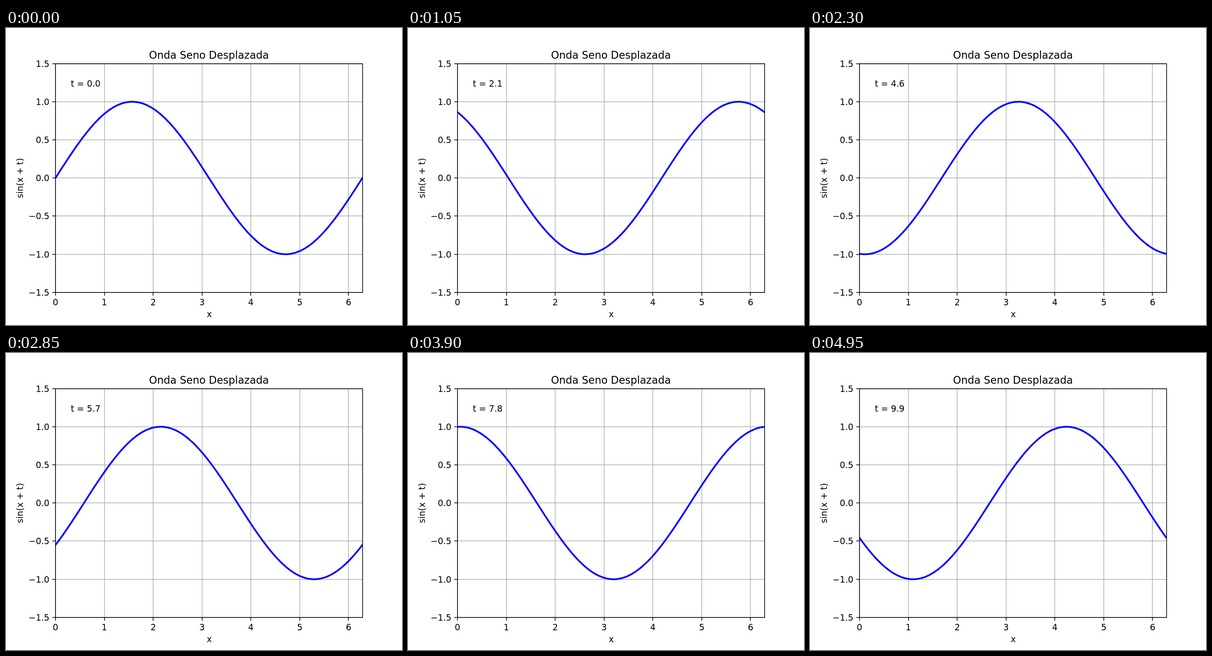
These frames come from a looping animation (864x648 px, 5000 ms). An HTML page with a canvas:

```html
<!DOCTYPE html>
<html lang="es">
<head>
<meta charset="utf-8">
<title>Onda Seno Desplazada</title>
<style>
  html, body { margin: 0; width: 100%; height: 100%; overflow: hidden; background: #fff; }
  canvas { display: block; }
</style>
</head>
<body>
<canvas id="plot" width="864" height="648"></canvas>
<script>
const ctx = document.getElementById('plot').getContext('2d');
const LEFT = 108, RIGHT = 777.6, TOP = 77.76, BOTTOM = 576.72;
const STEP_MS = 50, STEPS = 100, TAU = 2 * Math.PI;
const toX = x => LEFT + (RIGHT - LEFT) * x / TAU;
const toY = y => BOTTOM - (BOTTOM - TOP) * (y + 1.5) / 3;
const xTicks = [0, 1, 2, 3, 4, 5, 6];
const yTicks = [-1.5, -1, -0.5, 0, 0.5, 1, 1.5];

function line(x1, y1, x2, y2, color) {
  ctx.strokeStyle = color;
  ctx.lineWidth = 1.5;
  ctx.beginPath();
  ctx.moveTo(Math.round(x1), Math.round(y1));
  ctx.lineTo(Math.round(x2), Math.round(y2));
  ctx.stroke();
}

function label(text, x, y, align = 'center', size = 18.75) {
  ctx.font = `${size}px "DejaVu Sans", sans-serif`;
  ctx.textAlign = align;
  ctx.fillStyle = '#000';
  ctx.fillText(text, x, y);
}

function drawCurve(t) {
  ctx.save();
  ctx.beginPath();
  ctx.rect(LEFT, 78, 670, 499);
  ctx.clip();
  ctx.strokeStyle = '#00f';
  ctx.lineWidth = 3.75;
  ctx.lineJoin = 'round';
  ctx.lineCap = 'square';
  ctx.beginPath();
  for (let i = 0; i < 200; i++) {
    const x = TAU * i / 199;
    ctx.lineTo(toX(x), toY(Math.sin(x + t)));
  }
  ctx.stroke();
  ctx.restore();
}

function drawAxes() {
  for (const v of xTicks) {
    line(toX(v), 577, toX(v), 584, '#000');
    label(v, toX(v), 605);
  }
  for (const v of yTicks) {
    line(101, toY(v), 108, toY(v), '#000');
    label(v.toFixed(1).replace('-', '\u2212'), 94.8, Math.round(toY(v)) + 7, 'right');
  }
  ctx.lineWidth = 1.5;
  ctx.strokeStyle = '#000';
  ctx.strokeRect(108, 78, 670, 499);

  label('Onda Seno Desplazada', 442.8, 67, 'center', 22.5);
  label('x', 443.5, 631);
  ctx.save();
  ctx.translate(37, 327.5);
  ctx.rotate(-Math.PI / 2);
  label('sin(x + t)', 0, 0);
  ctx.restore();
}

function draw(now) {
  const t = Math.floor(now / STEP_MS) % STEPS / 10;
  ctx.fillStyle = '#fff';
  ctx.fillRect(0, 0, 864, 648);
  for (const v of xTicks) line(toX(v), TOP, toX(v), BOTTOM, '#b0b0b0');
  for (const v of yTicks) line(LEFT, toY(v), RIGHT, toY(v), '#b0b0b0');
  drawCurve(t);
  drawAxes();
  label('t = ' + t.toFixed(1), 141.5, 128, 'left');
}

const start = performance.now();
function tick() {
  draw(performance.now() - start);
  requestAnimationFrame(tick);
}
tick();
</script>
</body>
</html>
```
